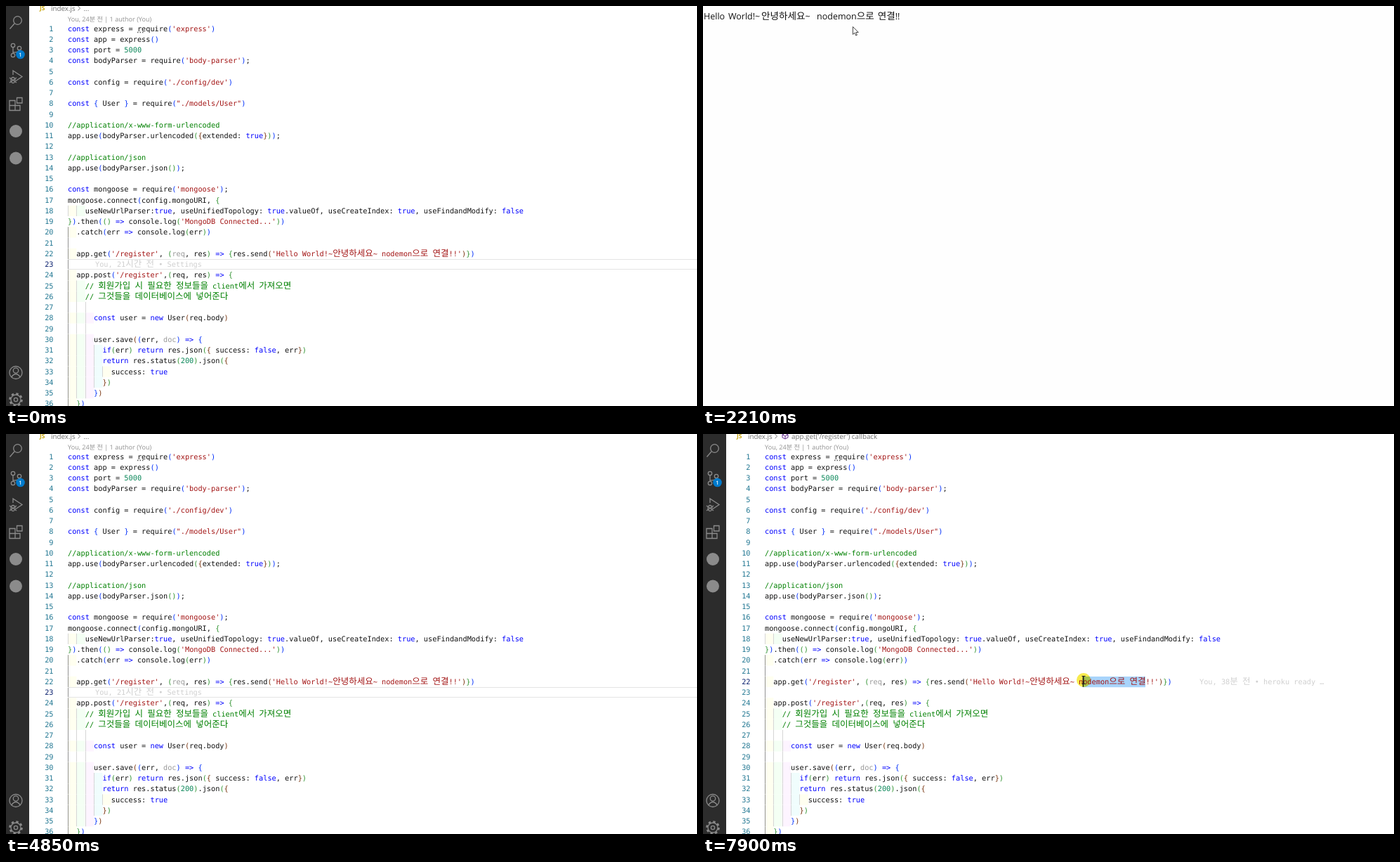
Recreate the animation shown at these times as an HTML page. Size 984 by 569 pixels, loop 8000 ms.

```html
<!DOCTYPE html>
<html lang="ko">
<head>
<meta charset="utf-8">
<style>
  html, body { margin: 0; width: 100%; height: 100%; overflow: hidden; background: #fff; }
  svg { display: block; width: 984px; height: 569px; }
  text { white-space: pre; text-rendering: geometricPrecision; }
  .mono { font: 10.27px "DejaVu Sans Mono", monospace; }
  .ui { font-family: "Open Sans", sans-serif; }
  .hangul { font-family: "Noto Sans CJK KR", "Noto Sans CJK", sans-serif; }
  .icons { fill: none; stroke: #8b8b8b; stroke-width: 1.3; }
</style>
</head>
<body>
<svg viewBox="0 0 984 569">
  <g id="editor">
    <rect width="984" height="569" fill="#fff"/>
    <rect width="33" height="569" fill="#2c2c2c"/>
    <g class="icons">
      <circle cx="16.5" cy="20.5" r="5.8"/><path d="M12 25L5.5 32.5"/>
      <circle cx="10" cy="56" r="2.7"/><circle cx="10" cy="70" r="2.7"/><circle cx="19" cy="60" r="2.7"/>
      <path d="M10 59V67M19 63Q18 66 10 66"/>
      <path d="M10 98V92L23 100.5L14 106.5M5 102L15 109M15 102L5 109"/><ellipse cx="10" cy="105.5" rx="3" ry="4"/>
      <path d="M5 134.5H13V148.5H5ZM5 141.5H20V148.5H5M15.5 130.5H23V138H15.5Z"/>
      <circle cx="14" cy="521.5" r="9"/><circle cx="14" cy="518.5" r="3.7"/><path d="M7.5 528Q14 519 20.5 528"/>
      <circle cx="14" cy="560" r="2.6"/><circle cx="14" cy="560" r="7"/>
      <circle cx="14" cy="560" r="8.5" stroke-width="2.6" stroke-dasharray="3.34"/>
    </g>
    <circle cx="14" cy="178" r="9" fill="#8b8b8b"/>
    <circle cx="14" cy="216.5" r="9" fill="#8b8b8b"/>
    <circle cx="20.5" cy="69" r="6.3" fill="#007acc"/>
    <text class="ui" x="20.5" y="71.7" font-size="7.5" font-weight="600" fill="#fff" text-anchor="middle">1</text>
    <g class="ui" font-size="9.8" fill="#6f6f6f">
      <text x="48" y="6.2" font-size="8.5" font-weight="700" fill="#c9a712">JS</text>
      <text x="64" y="6.5">index.js</text>
      <path d="M102.5 0L105.5 3.2L102.5 6.4" fill="none" stroke="#777"/>
      <text id="crumbShort" x="110.5" y="6.5">...</text>
      <g id="crumbLong">
        <path d="M117 -1L121 1V5L117 7L113 5V1ZM113 1L117 3L121 1M117 3V7" fill="none" stroke="#652d90"/>
        <text x="126" y="6.5">app.get('/register') callback</text>
      </g>
    </g>
    <g id="rows"></g>
    <path id="lineBox" d="M88 360.5H984M88 374.5H984" stroke="#e4e4e4"/>
    <rect id="selection" y="345" height="15.25" fill="#a8d4fb"/>
    <g id="code" class="mono"></g>
    <path d="M187 37.5H196" stroke="#555" stroke-width="1.5" stroke-dasharray="1.5 2"/>
    <rect id="caret" width="1.2" height="15"/>
  </g>
  <g id="page" class="ui" font-size="12.5" word-spacing="1.6"><rect width="984" height="569" fill="#fefefe"/></g>
  <circle id="press" r="10" fill="#f6e72e" opacity=".85" style="mix-blend-mode:multiply"/>
  <path id="ibeam" d="M-2.5 -5.5H2.5M0 -5V5M-2.5 5.5H2.5" fill="none" stroke="#222"/>
  <path id="arrow" d="M.5 .5V11.5L3 9.2L4.8 13L6.5 12.3L4.8 8.5H8.3Z" fill="#fff" stroke="#333" stroke-width=".9"/>
</svg>
<script>
const CHAR = 6.183, HANGUL = 11.5, INDENT = 2 * CHAR;
const LEFT = 88, TOP = 24.5, ROW = 15.25, BASELINE = 11;
const $ = id => document.getElementById(id);
const rowTop = line => TOP + (line - 1) * ROW;

const source = `const express = require('express')
const app = express()
const port = 5000
const bodyParser = require('body-parser');

const config = require('./config/dev')

const { User } = require("./models/User")

//application/x-www-form-urlencoded
app.use(bodyParser.urlencoded({extended: true}));

//application/json
app.use(bodyParser.json());

const mongoose = require('mongoose');
mongoose.connect(config.mongoURI, {
    useNewUrlParser:true, useUnifiedTopology: true.valueOf, useCreateIndex: true, useFindandModify: false
}).then(() => console.log('MongoDB Connected...'))
  .catch(err => console.log(err))

  app.get('/register', (req, res) => {res.send('Hello World!~안녕하세요~ nodemon으로 연결!!')})

  app.post('/register',(req, res) => {
    // 회원가입 시 필요한 정보들을 client에서 가져오면
    // 그것들을 데이터베이스에 넣어준다

      const user = new User(req.body)

      user.save((err, doc) => {
        if(err) return res.json({ success: false, err})
        return res.status(200).json({
          success: true
        })
      })
  })`.split('\n');

function set(node, attrs) {
  for (const key in attrs) node.setAttribute(key, attrs[key]);
  return node;
}

function add(parent, tag, attrs, content = '') {
  const node = set(document.createElementNS('http://www.w3.org/2000/svg', tag), attrs);
  node.textContent = content;
  return parent.appendChild(node);
}

// Hangul runs get their own font and size.
function addRuns(node, content, fill, hangulSize = HANGUL / 0.92) {
  content.split(/([가-힣]+)/).forEach((run, i) => {
    if (run) add(node, 'tspan', i % 2 ? { fill, class: 'hangul', style: `font-size:${hangulSize}px` } : { fill }, run);
  });
}

function addText(parent, x, y, content, fill, attrs, hangulSize) {
  const node = add(parent, 'text', { x, y, ...attrs });
  addRuns(node, content, fill, hangulSize);
  return node;
}

const tokenRule = /(\/\/.*)|('[^']*'|"[^"]*")|(\b(?:const|new|return|if|true|false)\b|=>)|(\b\d+\b)|(\bdoc\b|\breq(?=.*=> {r))|([()[\]{}])/g;
const tokenColors = ['#008000', '#a31515', '#0000ff', '#098658', '#999'];
const bracketColors = ['#0431fa', '#319331', '#7b3814'];
let depth = 0;

function addCode(line, content, indent) {
  const node = add($('code'), 'text', { x: LEFT + indent * CHAR, y: rowTop(line) + BASELINE });
  let end = indent;
  for (const match of content.matchAll(tokenRule)) {
    const [token, ...groups] = match;
    addRuns(node, content.slice(end, match.index), '#111');
    if (/[)\]}]/.test(groups[5])) depth--;
    addRuns(node, token, groups[5] ? bracketColors[depth % 3] : tokenColors[groups.findIndex(Boolean)]);
    if (/[(\[{]/.test(groups[5])) depth++;
    end = match.index + token.length;
  }
  addRuns(node, content.slice(end), '#111');
}

const rainbow = ['#fffff0', '#f4fff4', '#fdf4ff', '#f0fdfd'];
const indents = source.map(content => Math.max(0, content.search(/\S/)));
const activeScope = source.findIndex(content => content.includes('.catch'));

const lineNumbers = source.map((content, i) => {
  const line = i + 1, y = rowTop(line);
  // Blank lines continue the guides of their deeper neighbour.
  const guided = content ? indents[i] : Math.max(indents[i - 1], indents[i + 1]);
  for (let level = 0; level < guided / 2; level++) {
    const x = LEFT + level * INDENT;
    if (content) add($('rows'), 'rect', { x, y, width: INDENT, height: ROW, fill: rainbow[level % 4] });
    add($('rows'), 'rect', { x: Math.round(x), y, width: 1, height: ROW, fill: !level && i >= activeScope ? '#939393' : '#d6d6d6' });
  }
  addCode(line, content, indents[i]);
  return add($('code'), 'text', { x: 67.5, y: y + BASELINE, 'text-anchor': 'end' }, line);
});

addText($('editor'), LEFT, 21.5, 'You, 24분 전 | 1 author (You)', '#919191', { class: 'ui', 'font-size': 9.1 }, 9.1);
const oldBlame = addText($('code'), 127, rowTop(23) + BASELINE, 'You, 21시간 전 • Settings', '#d0d0d0');
const newBlame = addText($('code'), 707, rowTop(22) + BASELINE, 'You, 38분 전 • heroku ready …', '#d0d0d0');

addText($('page'), 1, 19, 'Hello World!~', '#111');
addText($('page'), 83, 19, '안녕하세요~', '#111', {}, 13.6);
addText($('page'), 162, 19, 'nodemon으로 연결!!', '#111', {}, 13.6);

// Pointer key points: time, x, y.
const path = [
  [700, 369, 491], [1110, 359, 274], [1240, 359, 274], [2070, 275, 35],
  [2210, 213, 29], [2550, 185, 18], [2760, 185, 18], [3580, 372, 172], [3920, 349, 600],
  [5180, 362, 481], [5670, 381, 261], [5950, 597, 350], [6400, 640, 352],
  [6820, 630, 352], [7280, 630, 352], [7900, 542, 350]
];

function pointerAt(t) {
  const next = path.findIndex(key => key[0] > t);
  if (next < 1) return path[next ? path.length - 1 : 0].slice(1);
  const [from, to] = [path[next - 1], path[next]];
  const u = (t - from[0]) / (to[0] - from[0]);
  return [1, 2].map(axis => from[axis] + (to[axis] - from[axis]) * u);
}

// Character boundaries the selection can snap to, right to left.
const SELECT_END = 630;
const stops = [SELECT_END];
for (const char of '결연 로으nomedo') {
  stops.push(stops[stops.length - 1] - (/[가-힣]/.test(char) ? HANGUL : CHAR));
}
const snap = x => stops.reduce((best, stop) => Math.abs(stop - x) < Math.abs(best - x) ? stop : best);

const show = (node, on) => set(node, { display: on ? 'inline' : 'none' });

function draw(t) {
  const onPage = t >= 500 && t < 4850;
  const pressed = t >= 6890;
  const [x, y] = pointerAt(t);

  show($('page'), onPage);
  show($('editor'), !onPage);
  show($('arrow'), t >= 700 && t < 3920);
  show($('ibeam'), t >= 5180);
  show($('press'), pressed);
  for (const id of ['arrow', 'ibeam', 'press']) set($(id), { transform: `translate(${x} ${y})` });

  show($('lineBox'), !pressed);
  show(oldBlame, !pressed);
  show(newBlame, t >= 7500);
  show($('crumbShort'), t < 7300);
  show($('crumbLong'), t >= 7300);

  const activeLine = pressed ? 22 : 23;
  lineNumbers.forEach((node, i) => set(node, { fill: i + 1 === activeLine ? '#0b216f' : '#237893' }));

  const caretX = pressed ? snap(x) : LEFT;
  const blinkOn = t >= 4990 && (t - 4990) % 1000 < 500;
  set($('caret'), { x: caretX, y: rowTop(activeLine) });
  show($('caret'), pressed || blinkOn);
  set($('selection'), { x: caretX, width: pressed ? SELECT_END - caretX : 0 });
}

function tick() {
  draw(performance.now() % 8000);
  requestAnimationFrame(tick);
}
tick();
</script>
</body>
</html>
```
